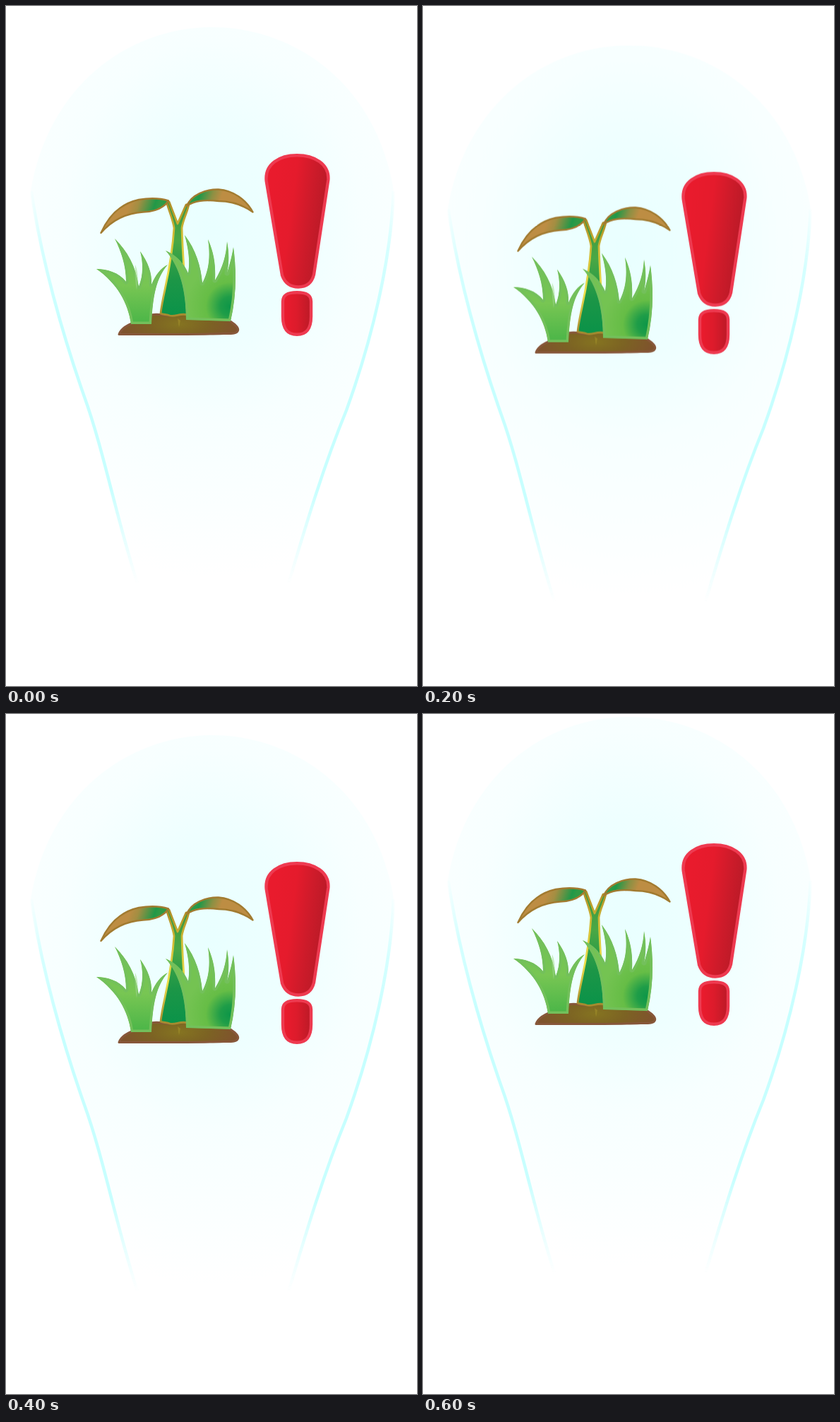
Write an HTML page that moves like this. It is 582x962 px and loops after 0.8 s.

```html
<!DOCTYPE html>
<html lang="en">
<head>
<meta charset="utf-8">
<title>Sprout alert</title>
<style>
  html, body { margin: 0; width: 100%; height: 100%; overflow: hidden; background: #fff; }
  svg { display: block; width: 100vw; height: 100vh; }
  #bob { animation: bob 800ms step-end infinite; }
  @keyframes bob {
    0%   { transform: translateY(0); }
    25%  { transform: translateY(25.6px); }
    50%  { transform: translateY(0); }
    75%  { transform: translateY(-26px); }
    100% { transform: translateY(0); }
  }
</style>
</head>
<body>
<svg viewBox="0 0 582 962" preserveAspectRatio="none">
  <defs>
    <radialGradient id="glow" gradientUnits="userSpaceOnUse" cx="0" cy="0" r="1"
      gradientTransform="translate(292 320) scale(385 488)">
      <stop offset="0" stop-color="#e9ffff"/>
      <stop offset=".3" stop-color="#eeffff"/>
      <stop offset=".55" stop-color="#f7ffff"/>
      <stop offset=".8" stop-color="#fbffff"/>
      <stop offset="1" stop-color="#fff"/>
    </radialGradient>
    <linearGradient id="rim" gradientUnits="userSpaceOnUse" x1="0" y1="255" x2="0" y2="818">
      <stop offset="0" stop-color="#c8ffff" stop-opacity="0"/>
      <stop offset=".16" stop-color="#c8ffff" stop-opacity=".75"/>
      <stop offset=".35" stop-color="#c6ffff"/>
      <stop offset=".76" stop-color="#c8ffff"/>
      <stop offset="1" stop-color="#d0ffff" stop-opacity="0"/>
    </linearGradient>
    <linearGradient id="leafL" gradientUnits="userSpaceOnUse" x1="176" y1="277" x2="214" y2="290">
      <stop offset="0" stop-color="#bd8d43"/>
      <stop offset=".3" stop-color="#a38e42"/>
      <stop offset=".85" stop-color="#219848"/>
      <stop offset="1" stop-color="#2f9a45"/>
    </linearGradient>
    <linearGradient id="leafR" gradientUnits="userSpaceOnUse" x1="268" y1="264" x2="303" y2="276">
      <stop offset="0" stop-color="#2f9a45"/>
      <stop offset=".2" stop-color="#219848"/>
      <stop offset=".65" stop-color="#8c9043"/>
      <stop offset="1" stop-color="#bd8d43"/>
    </linearGradient>
    <linearGradient id="stem" gradientUnits="userSpaceOnUse" x1="0" y1="275" x2="0" y2="437">
      <stop offset="0" stop-color="#3d963e"/>
      <stop offset=".35" stop-color="#4aa845"/>
      <stop offset=".7" stop-color="#1c9647"/>
      <stop offset="1" stop-color="#0b9349"/>
    </linearGradient>
    <linearGradient id="stemEdge" gradientUnits="userSpaceOnUse" x1="0" y1="275" x2="0" y2="437">
      <stop offset="0" stop-color="#ab8a27"/>
      <stop offset=".3" stop-color="#d3bd35"/>
      <stop offset=".65" stop-color="#ebdf4a"/>
      <stop offset="1" stop-color="#a58b2f"/>
    </linearGradient>
    <linearGradient id="tuftL" gradientUnits="userSpaceOnUse" x1="0" y1="340" x2="0" y2="450">
      <stop offset="0" stop-color="#70c156"/>
      <stop offset=".5" stop-color="#78c653"/>
      <stop offset="1" stop-color="#4ab548"/>
    </linearGradient>
    <radialGradient id="tuftR" gradientUnits="userSpaceOnUse" cx="317" cy="425" r="62">
      <stop offset="0" stop-color="#0d9648"/>
      <stop offset=".22" stop-color="#1f9d48"/>
      <stop offset=".55" stop-color="#66bd46"/>
      <stop offset="1" stop-color="#74c352"/>
    </radialGradient>
    <radialGradient id="soil" gradientUnits="userSpaceOnUse" cx="0" cy="0" r="1"
      gradientTransform="translate(245 450) scale(82 32)">
      <stop offset="0" stop-color="#857421"/>
      <stop offset=".5" stop-color="#7c6323"/>
      <stop offset="1" stop-color="#7f532d"/>
    </radialGradient>
    <linearGradient id="red" gradientUnits="userSpaceOnUse" x1="374" y1="290" x2="452" y2="300">
      <stop offset="0" stop-color="#e91b2d"/>
      <stop offset=".38" stop-color="#e51b2c"/>
      <stop offset=".7" stop-color="#cd1b2a"/>
      <stop offset="1" stop-color="#b91a27"/>
    </linearGradient>
    <linearGradient id="redDot" x1="0" y1="0" x2="1" y2="0">
      <stop offset=".1" stop-color="#e91b2d"/>
      <stop offset=".5" stop-color="#dc1b2b"/>
      <stop offset="1" stop-color="#bb1a27"/>
    </linearGradient>
    <path id="grassL" d="M128 372C143 372 160 377 170 390C170 367 163 347 154 329C172 347 184 368 188 397C195 380 194 362 190 347C201 362 207 378 206 394C212 380 219 371 229 366C213 385 208 408 206 450H177C173 420 157 392 128 372Z"/>
    <path id="grassR" d="M226 346C240 352 251 362 258 378C261 358 258 343 253 324C269 345 276 368 278 392C289 371 289 350 286 330C295 350 297 368 296 388C307 370 312 352 313 333C316 350 316 362 313 378C317 364 320 354 322 341C327 378 326 411 318 446L255 444C255 404 247 370 226 346Z"/>
    <clipPath id="clipL"><use href="#grassL"/></clipPath>
    <clipPath id="clipR"><use href="#grassR"/></clipPath>
  </defs>

  <g id="bob" stroke-linejoin="round">
    <!-- balloon -->
    <path fill="url(#glow)" d="M292 30C410 30 526 112 549 262C546 350 520 470 480 575C448 655 422 735 400 812H187C165 735 144 650 120 577C82 473 50 360 35 262C60 112 174 30 292 30Z"/>
    <g fill="none" stroke="url(#rim)" stroke-width="4.4">
      <path d="M36 262C49 355 80 465 111 553C138 628 154 715 186 817"/>
      <path d="M548.5 262C546 355 519 470 482 572C450 650 426 730 400 817"/>
    </g>

    <!-- sprout -->
    <path fill="url(#soil)" stroke="#87573a" stroke-width="3" d="M160 464.500C163 456 173 450 187 446L206 437C217 434 225 439 233 438C243 438 248 432 258 437L316 445C322 449 330 454 328.500 459C327 464 319 463.500 308 463.500C270 465 210 464.500 160 464.500Z"/>
    <path d="M243 442L247 445L245 455Z" fill="#9c8a29" opacity=".7"/>
    <path fill="url(#stem)" stroke="url(#stemEdge)" stroke-width="2.8" d="M227 276L231 277L243 308L255 281L259 280C257 292 251 301 249 314C250 345 253 390 257 437C247 434 240 440 232 438C227 436 223 437 219 435C222 406 234 374 238 314C236 301 231 291 227 276Z"/>
    <g stroke="#a27b30" stroke-width="2.4">
      <path fill="url(#leafL)" d="M134.500 321C146 295 165 279 188 274C206 271 219 272 230 275.500C222 288 207 291 194 291.500C170 293 151 302 134.500 321Z"/>
      <path fill="url(#leafR)" d="M256 283C262 267 283 259 301 259.500C322 261 340 274 349.500 291.500C336 282 319 276 301 276C281 274 267 275 256 283Z"/>
    </g>

    <!-- grass: the edge is clipped to the inside so the tips stay sharp -->
    <g stroke="#73c05b" stroke-width="7">
      <use href="#grassL" fill="url(#tuftL)" clip-path="url(#clipL)"/>
      <use href="#grassR" fill="url(#tuftR)" clip-path="url(#clipR)"/>
    </g>
    <path d="M183 366C188 378 187 390 185 402C183 391 182 380 183 366Z" fill="#a0d985" opacity=".5"/>

    <!-- exclamation mark -->
    <g stroke="#ee3a50" stroke-width="4.4">
      <path fill="url(#red)" d="M412 211.200C436 211.200 458 223 456.300 246L436 380C433 392 426 397.500 414 397.500C402 397.500 395 392 391 381L368.700 248C366 223 388 211.200 412 211.200Z"/>
      <path fill="url(#redDot)" d="M412 405.200C424 405.200 432 408 432 418V439C432 456 426 464.800 412 464.800C398 464.800 392 456 392 439V418C392 408 400 405.200 412 405.200Z"/>
    </g>
  </g>
</svg>
</body>
</html>
```
